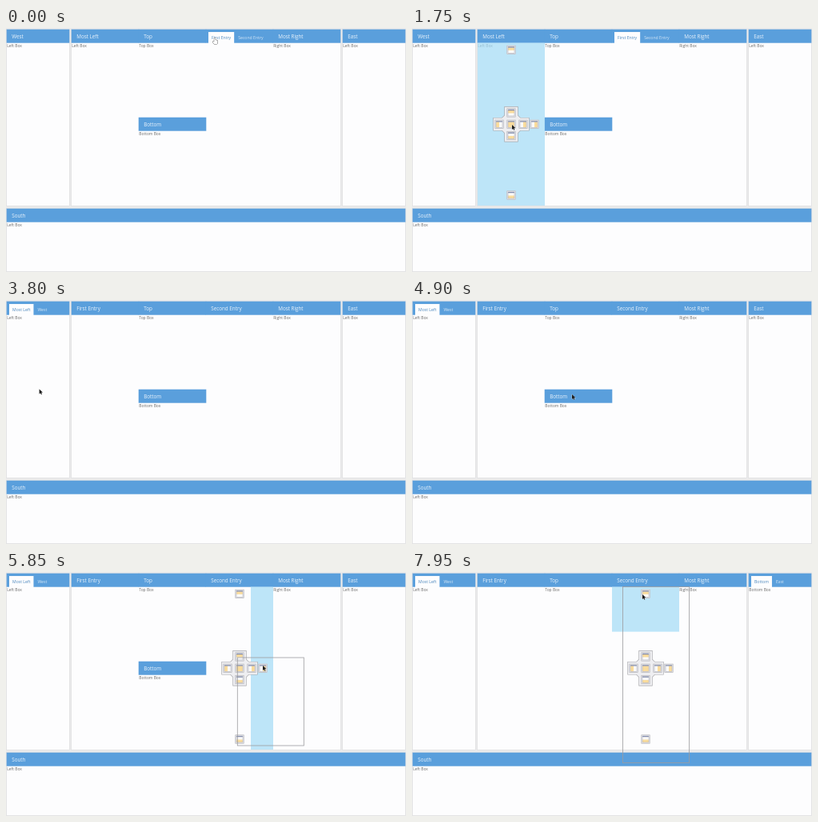
These frames come from a looping animation (500 px wide and 305 px high, 8 s). An HTML page with a canvas:

```html
<!DOCTYPE html>
<html lang="en">
<head>
<meta charset="utf-8">
<title>Docking layout</title>
<style>
html, body { margin: 0; width: 100%; height: 100%; overflow: hidden; background: #ebebec; }
canvas { display: block; width: 500px; height: 305px; }
</style>
</head>
<body>
<canvas id="stage"></canvas>
<script>
const LOOP = 8000, STEP = 50, MOVE = 550;
const HEAD = 16.5, COL = 84, TALL = 220;
const BLUE = '#5a9fdc', PAPER = '#fdfdfe';
const FONT = '"Open Sans", "Noto Sans", sans-serif';
const canvas = document.getElementById('stage');
const ctx = canvas.getContext('2d');
const ratio = window.devicePixelRatio || 1;
canvas.width = 500 * ratio;
canvas.height = 305 * ratio;
ctx.scale(ratio, ratio);

// Pointer stops: arrival time, x, y
const stops = [
  [0, 261, 13], [1100, 125, 121], [2400, 130, 13], [2900, 115, 17],
  [3500, 41, 121], [4250, 48, 12], [4800, 200, 118], [5700, 321, 117],
  [6400, 436, 13], [6900, 359, 12], [7050, 359, 12], [7150, 308, 24],
  [7200, 302, 31], [7550, 300, 95], [7920, 288, 28]
];

// A drag without a height carries a single tab
const drags = [
  { from: 60, to: 1850, home: 'second' },
  { from: 2650, to: 3700, home: 'left', ghost: 'Most Left' },
  { from: 4950, to: 6400, home: 'bottom', dx: 32, h: TALL / 2 },
  { from: 7110, to: LOOP, home: 'right', dx: 25, h: TALL }
];

const smooth = k => k * k * (3 - 2 * k);
const clamp = k => Math.min(1, Math.max(0, k));

// Rest at each stop, then travel to the next for at most MOVE
function pointer(t) {
  const i = stops.findIndex(s => s[0] > t);
  if (i < 1) {
    const [, x, y] = i < 0 ? stops[stops.length - 1] : stops[0];
    return { x, y };
  }
  const [t0, x0, y0] = stops[i - 1], [t1, x1, y1] = stops[i];
  const leave = Math.max(t0, t1 - MOVE);
  const k = smooth(clamp((t - leave) / (t1 - leave)));
  return { x: x0 + (x1 - x0) * k, y: y0 + (y1 - y0) * k };
}

function layout(drops) {
  const panel = (id, tabs, label, x, w = COL, y = 2, h = TALL) => ({ id, x, y, w, h, tabs, label });
  const column = (i, id, tabs, label, ...rest) => panel(id, tabs, label, 82 + COL * i, COL, ...rest);
  const leftTabs = [['Most Left'], ['First Entry', 'Most Left'], ['First Entry']];
  const moved = drops > 2;
  const list = [
    panel('west', drops > 1 ? ['Most Left', 'West'] : ['West'], 'Left Box', 1, 78),
    column(0, 'left', leftTabs[Math.min(drops, 2)], drops ? '' : 'Left Box'),
    column(1, 'top', ['Top'], 'Top Box', 2, moved ? TALL : TALL / 2),
    column(2, 'second', drops ? ['Second Entry'] : ['First Entry', 'Second Entry'], ''),
    column(3, 'right', ['Most Right'], 'Right Box'),
    panel('east', moved ? ['Bottom', 'East'] : ['East'], moved ? 'Bottom Box' : 'Left Box', 421, 78),
    panel('south', ['South'], 'Left Box', 1, 498, 226, 78)
  ];
  if (!moved) list.push(column(1, 'bottom', ['Bottom'], 'Bottom Box', 2 + TALL / 2, TALL / 2));
  return list;
}

function fill(color, x, y, w, h) {
  ctx.fillStyle = color;
  ctx.fillRect(x, y, w, h);
}

function frame(color, x, y, w, h, line = 0.8) {
  ctx.strokeStyle = color;
  ctx.lineWidth = line;
  ctx.strokeRect(x, y, w, h);
}

function text(str, x, y, size, color) {
  ctx.font = `400 ${size}px ${FONT}`;
  ctx.fillStyle = color;
  ctx.fillText(str, x, y);
  return ctx.measureText(str).width;
}

function drawTabs(p, ghost) {
  let x = p.x + 3;
  p.tabs.forEach((name, i) => {
    ctx.font = `400 5.15px ${FONT}`;
    const w = ctx.measureText(name).width + 8;
    const faded = name === ghost;
    if (!i) fill(PAPER, x, p.y + 3, w, HEAD - 2.5);
    else if (faded) fill('#4f8dc6', x, p.y + 3, w, HEAD - 3);
    text(name, x + 4, p.y + 12, 5.15, !i ? '#4a86bd' : faded ? '#b4d0ea' : '#d4e6f6');
    x += w + 1;
  });
}

function drawPanel(p, ghost) {
  fill(PAPER, p.x, p.y, p.w, p.h);
  fill(BLUE, p.x - 0.3, p.y - 0.3, p.w + 0.6, HEAD + 0.5);
  if (p.tabs.length > 1) drawTabs(p, ghost);
  else text(p.tabs[0], p.x + 6.2, p.y + 10.7, 6.3, '#eaf3fb');
  text(p.label, p.x + 0.3, p.y + 21.8, 4.9, '#6a6a6a');
}

function body(p) {
  return { x: p.x, y: p.y + HEAD, w: p.w, h: p.h - HEAD };
}

function centre({ x, y, w, h }) {
  return { x: x + w / 2, y: y + h / 2 };
}

// Inner buttons cover half of the panel, outer ones less
function buttons(p) {
  const b = body(p), c = centre(b);
  const inner = { all: [0, 0], left: [-1, 0], right: [1, 0], top: [0, -1], bottom: [0, 1] };
  const list = Object.entries(inner).map(([side, [dx, dy]]) =>
    ({ x: c.x + dx * 15, y: c.y + dy * 14.3, side, part: 0.5 }));
  return list.concat(
    { x: c.x + 29, y: c.y, side: 'right', part: 1 / 3 },
    { x: c.x, y: b.y + 8.8, side: 'top', part: 0.276 },
    { x: c.x, y: b.y + b.h - 13, side: 'bottom', part: 0.276 }
  );
}

function portion({ x, y, w, h }, side, part) {
  const pw = side === 'left' || side === 'right' ? w * part : w;
  const ph = side === 'top' || side === 'bottom' ? h * part : h;
  return [side === 'right' ? x + w - pw : x, side === 'bottom' ? y + h - ph : y, pw, ph];
}

function drawButton({ x, y, side }) {
  fill('#ececef', x - 5.5, y - 5.5, 11, 11);
  frame('#b0b0b4', x - 5.2, y - 5.2, 10.4, 10.4, 0.6);
  fill('#fbfaf8', x - 4, y - 4, 8, 8);
  fill('#fadc9c', ...portion({ x: x - 4, y: y - 3, w: 8, h: 7 }, side, 0.5));
  fill('#7782a6', x - 4, y - 4, 8, 1.2);
  frame('#a4a8ba', x - 4, y - 4, 8, 8, 0.5);
}

// Two arms joined by a diamond, with one common outline
function drawCross({ x, y }) {
  const cross = new Path2D();
  cross.rect(x - 8, y - 21.5, 16, 43);
  cross.rect(x - 22, y - 7.7, 44, 15.4);
  cross.moveTo(x - 19, y);
  for (const [dx, dy] of [[0, -1], [1, 0], [0, 1]]) cross.lineTo(x + dx * 19, y + dy * 19);
  cross.closePath();
  ctx.strokeStyle = '#a8a8ac';
  ctx.lineWidth = 1.3;
  ctx.stroke(cross);
  ctx.fillStyle = '#eeeef1';
  ctx.fill(cross);
}

function drawGuides(p, at) {
  const list = buttons(p);
  const hit = list.find(b => Math.abs(b.x - at.x) < 5.6 && Math.abs(b.y - at.y) < 5.6);
  if (hit) fill('rgba(165,221,247,.72)', ...portion(body(p), hit.side, hit.part));
  drawCross(centre(body(p)));
  list.forEach(drawButton);
}

function drawOutline(drag, at, onTabs) {
  if (onTabs) frame('#8f9499', at.x - 7, at.y - 6.5, 29, 13);
  else if (drag.h) frame('#9c9c9e', at.x - drag.dx + 0.3, at.y - 10, 83, drag.h);
}

function drawPointer(at, hand) {
  const arrow = new Path2D('M0 0V7.2L1.7 5.7L2.9 8.2L4.1 7.6L3 5.2L5.2 5Z');
  const fist = new Path2D('M-.7-.6Q0-1.4.7-.6V2L3.5 2.7V5L2.8 7H-1L-2.8 4.1L-1.9 3.3L-.7 4.2Z');
  const shape = hand ? fist : arrow;
  ctx.save();
  ctx.translate(at.x, at.y);
  if (!hand) ctx.scale(0.82, 0.82);
  ctx.lineWidth = 0.7;
  ctx.fillStyle = hand ? '#fff' : '#1c1c1c';
  ctx.strokeStyle = hand ? '#222' : '#eee';
  ctx.stroke(shape);
  ctx.fill(shape);
  ctx.restore();
}

function inside(p, at) {
  return at.x >= p.x && at.x < p.x + p.w && at.y >= p.y && at.y < p.y + p.h;
}

function draw(t) {
  const drops = drags.filter(d => t >= d.to).length;
  const drag = drags.find(d => t >= d.from && t < d.to);
  const panels = layout(drops);
  // The dragged outline trails the pointer by one step
  const tip = pointer(t), at = pointer(t - STEP);
  const over = panels.find(p => inside(p, at));
  const inHead = over && at.y < over.y + HEAD;
  const own = drag && over && over.id === drag.home;

  fill('#ebebec', 0, 0, 500, 305);
  for (const [x, w] of [[1, 78], [82, COL * 4], [421, 78]]) {
    frame('#dedee0', x - 0.5, 1.5, w + 1, TALL + 1, 0.6);
  }
  frame('#dedee0', 0.5, 225.5, 499, 79, 0.6);
  panels.forEach(p => drawPanel(p, inHead && own ? drag.ghost : ''));

  if (drag) {
    const alone = own && over.tabs.length === 1;
    if (over && !inHead && !alone) drawGuides(over, at);
    drawOutline(drag, at, inHead && !alone);
  }
  const strip = panels.find(p => p.tabs.length > 1 && inside(p, tip));
  drawPointer(tip, strip && tip.y < strip.y + HEAD && tip.x < strip.x + 70);
}

const start = performance.now();
function tick() {
  const t = (performance.now() - start) % LOOP;
  draw(Math.floor(t / STEP) * STEP);
  requestAnimationFrame(tick);
}
tick();
</script>
</body>
</html>
```
